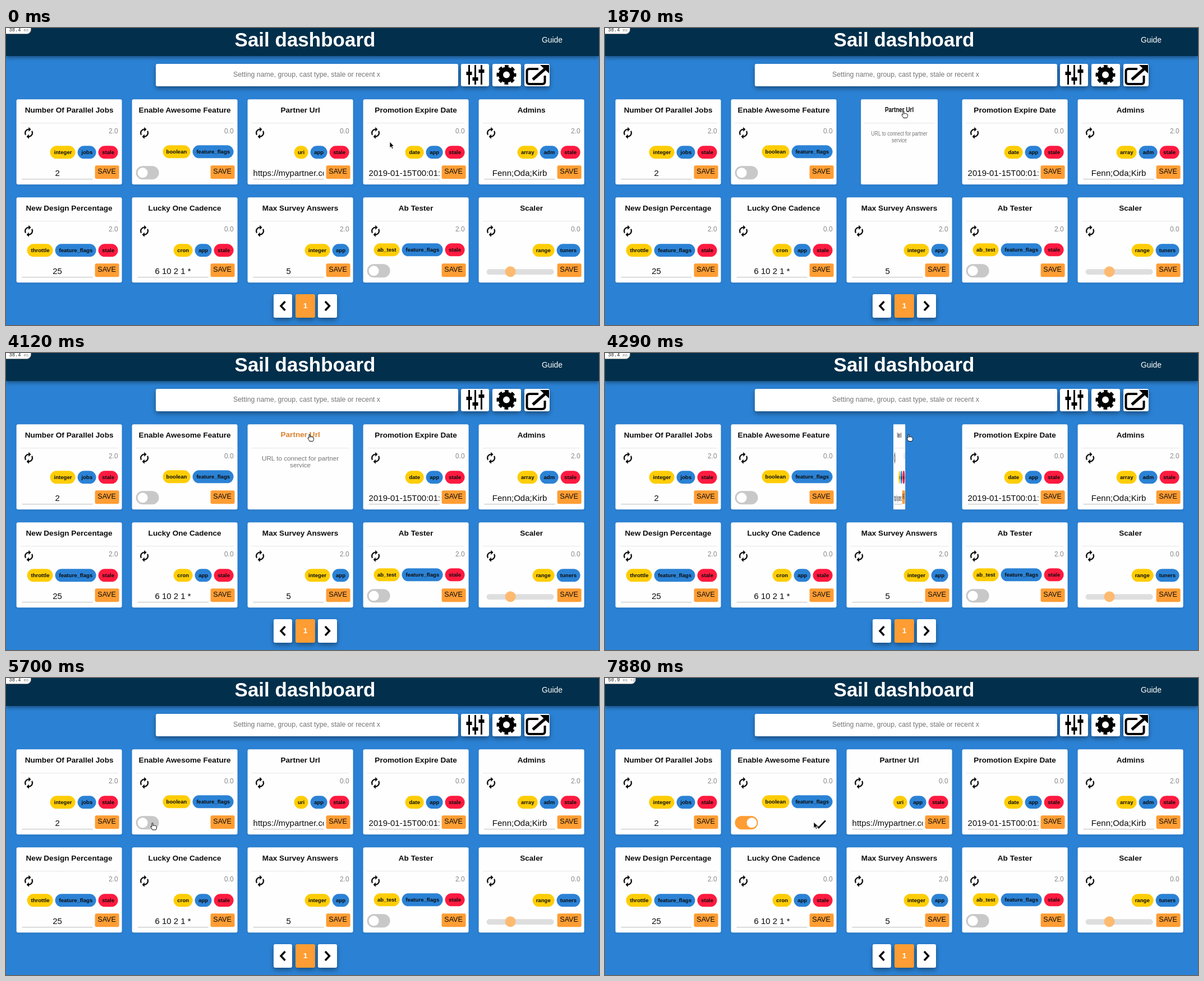
Recreate the animation shown at these times as an HTML page. Size 1057 by 530 pixels, loop 8000 ms.

```html
<!DOCTYPE html>
<html lang="en">
<head>
<meta charset="utf-8">
<title>Sail dashboard</title>
<style>
  html, body { margin: 0; width: 100%; height: 100%; overflow: hidden; }
  body { position: relative; background: #2b82d5; color: #0c0c0c; font-family: 'Liberation Sans', Arial, sans-serif; }
  body *, .box { box-sizing: border-box; }
  .box, .card, .card > * { position: absolute; white-space: nowrap; text-align: center; }
  header { position: absolute; width: 100%; height: 50px; background: #022f4b; box-shadow: 0 3px 7px #0006; }
  .panel { background: #fff; border-radius: 3px; box-shadow: 0 4px 9px #0006; }
  .panel svg { position: absolute; left: 0; top: 0; overflow: visible; }
  .card { width: 188px; height: 152px; translate: .6px .3px; background: #fefefe; border-radius: 3px; box-shadow: 0 1px 4px #0002; }
  .card h2 { left: 0; top: 10px; width: 100%; margin: 0; font-size: 13.6px; line-height: 20px; }
  .card hr { left: 7px; top: 42px; width: 174px; height: 1px; margin: 0; border: 0; background: #e4e4e4; }
  .sync { left: 11px; top: 49px; width: 22px; height: 22px; transform: scaleX(-1); stroke: #0c0c0c; stroke-width: .5; }
  .version { right: 7px; top: 47px; font-size: 12px; line-height: 20px; color: #888; }
  .tags { right: 7px; top: 83px; display: flex; gap: 4px; }
  .tags b { padding: 0 6.5px; border-radius: 12px; font-size: 9.6px; line-height: 23px; background: #2b82d5; }
  .tags b:first-child { background: #fecd06; }
  .tags b.stale { background: #ff1a40; }
  .save { left: 139.5px; top: 118px; width: 43px; height: 24px; border-radius: 3px; background: #fe9d33;
    font-size: 12.6px; line-height: 23px; }
  .input { left: 10px; top: 121px; width: 126px; height: 22px; overflow: hidden; border-bottom: 1px solid #bbb;
    font-size: 15px; line-height: 21px; }
  .toggle { left: 7px; top: 119px; width: 41px; height: 24px; border-radius: 12px; background: #c8c8c8; }
  .toggle i { position: absolute; left: 2.5px; top: 3px; width: 18px; height: 18px; border-radius: 50%; background: #fff; }
  .range { left: 13.5px; top: 127.5px; width: 120px; height: 10px; border-radius: 5px; background: #dedede; }
  .range i { position: absolute; left: 33.5px; top: -4.5px; width: 19px; height: 19px; border-radius: 50%; background: #feba70; }
  .about { left: 0; top: 54.5px; width: 100%; font-size: 11.7px; line-height: 12px; color: #757575; display: none; }
  .back > * { display: none; }
  .back > h2, .back > hr, .back > .about { display: block; }
  .back > h2 { top: 9.3px; }
  #badge { left: -1px; top: -1px; height: 12px; padding-left: 5.5px; text-align: left; background: #fff; border: 1px solid #8a8a8a;
    border-bottom-right-radius: 8px; font: 8.7px/9px 'Liberation Mono', monospace; color: #222; }
  #badge small { font-size: 7.4px; color: #888; }
  #overlay { position: absolute; left: 0; top: 0; }
</style>
</head>
<body>
<header></header>
<div class="box" style="left:333px;top:1px;width:400px;font:bold 35px/40px 'Liberation Sans',sans-serif;color:#fff">Sail dashboard</div>
<div class="box" style="left:955px;top:11px;font-size:13.9px;line-height:20px;color:#fff">Guide</div>
<div class="box" id="badge"></div>

<div class="box panel" style="left:266.5px;top:64px;width:539px;height:39.5px;font-size:12.35px;line-height:38.5px;color:#757575">Setting name, group, cast type, stale or recent x</div>
<div class="box panel" style="left:811px;top:64px;width:50px;height:40px">
  <svg width="50" height="40" stroke="#000">
    <path d="M14.5 2V37M25.5 2V37M36.5 2V37" stroke-width="3"/>
    <path d="M9.5 17h10M20.5 27h10M31.5 13h10" stroke-width="6"/>
  </svg>
</div>
<div class="box panel" style="left:867px;top:64px;width:50.5px;height:40px">
  <svg width="50" height="40" fill="none" stroke="#000">
    <circle cx="25" cy="19.5" r="10" stroke-width="8"/>
    <circle cx="25" cy="19.5" r="15" stroke-width="5" stroke-dasharray="6.6 5.18" stroke-dashoffset="3.3"/>
  </svg>
</div>
<div class="box panel" style="left:923.5px;top:64px;width:45px;height:40px">
  <svg width="45" height="40" fill="none" stroke="#000" stroke-width="4">
    <path d="M25 9H9Q4.5 9 4.5 13.5V31.5Q4.5 36 9 36H32Q36.5 36 36.5 31.5V21"/>
    <path d="M15 28L38 8" stroke-width="5"/>
    <path d="M28 2H44V17Z" fill="#000" stroke="none"/>
  </svg>
</div>

<div id="cards"></div>

<div class="box panel" style="left:477px;top:475px;width:33px;height:42px">
  <svg width="33" height="42" fill="none" stroke="#000" stroke-width="3.4"><path d="M20.5 13L13 21L20.5 29"/></svg>
</div>
<div class="box panel" style="left:516px;top:475px;width:35px;height:42px;background:#fe9d33;color:#fff;font-size:13.6px;line-height:42px;font-weight:bold">1</div>
<div class="box panel" style="left:556px;top:475px;width:33.5px;height:42px">
  <svg width="33" height="42" fill="none" stroke="#000" stroke-width="3.4"><path d="M13 13L20.5 21L13 29"/></svg>
</div>

<svg id="overlay" width="1057" height="530">
  <path id="check" d="M374.5 261L381 267L393 254.5" pathLength="1" stroke-dasharray="1 2" fill="none" stroke="#111" stroke-width="2.8"/>
  <g id="cursor">
    <path id="arrow" d="M0 0V11L2.5 8.7 4.2 12.8 6 12 4.3 8H7.6Z" fill="#000" stroke="#fff" stroke-width=".8"/>
    <path id="hand" d="M-1 1c0-1.5 2-1.5 2 0v4c2-1 5 0 6 1 1 .5.8 4-1 6.5H0C-1 10-3 8-3 6.5c.5-1 1.5-.5 2 .5z" fill="#fff" stroke="#111"/>
  </g>
</svg>

<script>
const $ = id => document.getElementById(id);

const SYNC = 'M12 4V1L8 5l4 4V6c3.31 0 6 2.69 6 6 0 1.01-.25 1.97-.7 2.8l1.46 1.46C19.54 15.03 20 13.57 20 12c0-4.42-3.58-8-8-8z' +
  'm0 14c-3.31 0-6-2.69-6-6 0-1.01.25-1.97.7-2.8L5.24 7.74C4.46 8.97 4 10.43 4 12c0 4.42 3.58 8 8 8v3l4-4-4-4v3z';
const TOGGLE = '<div class="toggle"><i></i></div>';
const RANGE = '<div class="range"><i></i></div>';
const input = text => `<div class="input">${text}</div>`;

const settings = [
  ['Number Of Parallel Jobs', '2.0', 'integer jobs stale', input('2')],
  ['Enable Awesome Feature', '0.0', 'boolean feature_flags', TOGGLE],
  ['Partner Url', '0.0', 'uri app stale', input('https://mypartner.com')],
  ['Promotion Expire Date', '0.0', 'date app stale', input('2019-01-15T00:01:00')],
  ['Admins', '2.0', 'array adm stale', input('Fenn;Oda;Kirb')],
  ['New Design Percentage', '2.0', 'throttle feature_flags stale', input('25')],
  ['Lucky One Cadence', '0.0', 'cron app stale', input('6 10 2 1 *')],
  ['Max Survey Answers', '2.0', 'integer app', input('5')],
  ['Ab Tester', '2.0', 'ab_test feature_flags stale', TOGGLE],
  ['Scaler', '0.0', 'range tuners', RANGE],
];

const tagHTML = tag => `<b${tag === 'stale' ? ' class="stale"' : ''}>${tag}</b>`;

$('cards').innerHTML = settings.map(([name, version, tags, field], i) => `
  <div class="card" style="left:${18 + 206 * (i % 5)}px;top:${i < 5 ? 127 : 302}px">
    <h2>${name}</h2><hr>
    <svg class="sync" viewBox="0 0 24 24"><path d="${SYNC}"/></svg>
    <div class="version">${version}</div>
    <div class="tags" ${field === TOGGLE ? 'style="top:82px"' : ''}>${tags.split(' ').map(tagHTML).join('')}</div>
    ${field}
    <div class="save">SAVE</div>
    <div class="about">URL to connect for partner<br>service</div>
  </div>`).join('');

const cards = document.querySelectorAll('.card');
const partner = cards[2], partnerTitle = partner.querySelector('h2');
const toggle = cards[1].querySelector('.toggle'), knob = toggle.firstChild;
const save = cards[1].querySelector('.save');

const LOOP = 8000;
// Bursts of screen updates: first, last, count
const bursts = [
  [0, 0, 1], [180, 910, 9], [1000, 1790, 10], [1870, 2050, 3], [3130, 3730, 8], [4120, 4560, 6],
  [4740, 5520, 10], [5610, 5700, 2], [5880, 6230, 5], [6490, 7270, 10], [7360, 7710, 5], [7880, 7880, 1],
];
// Cursor tip: time, x, y
const route = [
  [0, 684, 203], [179, 684, 203], [360, 668, 210], [640, 592, 190], [910, 531, 158],
  [1000, 531, 152], [1180, 532, 148], [3129, 532, 148], [3130, 535, 148], [3730, 541, 145], [4739, 541, 145],
  [4740, 537, 161], [4827, 524, 195], [5090, 380, 240], [5350, 285, 256], [5520, 266, 257], [5700, 261, 258.5],
  [6489, 261, 258.5], [6663, 344, 255], [6900, 365, 255], [7270, 372, 257], [LOOP, 372, 257],
];

const clamp = v => Math.min(1, Math.max(0, v));
const progress = (t, start, length) => clamp((t - start) / length);

// CSS "ease": cubic-bezier(.25, .1, .25, 1)
function ease(x) {
  const bezier = (s, a, b) => 3 * (1 - s) ** 2 * s * a + 3 * (1 - s) * s * s * b + s ** 3;
  let lo = 0, hi = 1;
  for (let i = 0; i < 20; i++) {
    const mid = (lo + hi) / 2;
    if (bezier(mid, .25, .25) < x) lo = mid; else hi = mid;
  }
  return bezier(lo, .1, 1);
}

// Hold each screen update until the next one
function hold(t) {
  const [first, last, count] = bursts.findLast(b => b[0] <= t);
  if (count === 1) return first;
  const step = (last - first) / (count - 1);
  return first + step * Math.min(count - 1, Math.floor((t - first + 8) / step));
}

function cursorAt(t) {
  const i = Math.max(1, route.findIndex(p => p[0] >= t));
  const [t0, x0, y0] = route[i - 1], [t1, x1, y1] = route[i];
  const k = (t - t0) / (t1 - t0);
  return [x0 + (x1 - x0) * k, y0 + (y1 - y0) * k];
}

function render(t) {
  const [x, y] = cursorAt(t);
  const overLink = t >= 999 && t < 4739 || t > 5420 && t < 6489;
  $('cursor').setAttribute('transform', `translate(${x} ${y})`);
  $('hand').style.display = overLink ? '' : 'none';
  $('arrow').style.display = overLink ? 'none' : '';

  const turn = ease(progress(t, 1594, 600)) - ease(progress(t, 4109, 600));
  const back = turn > .5;
  partner.classList.toggle('back', back);
  partner.style.transform = `scaleX(${Math.abs(Math.cos(turn * Math.PI))})`;
  const hover = back ? t > 3180 : t >= 999 && t < 2000;
  partnerTitle.style.color = hover ? '#d9822b' : '';

  const on = ease(progress(t, 5860, 400));
  const mix = (a, b) => a + (b - a) * on;
  toggle.style.background = `rgb(${mix(200, 254)},${mix(200, 157)},${mix(200, 51)})`;
  knob.style.transform = `translateX(${18 * on}px)`;

  save.style.visibility = t >= 7359 ? 'hidden' : '';
  const drawn = progress(t, 7400, 310);
  $('check').style.display = drawn ? '' : 'none';
  $('check').style.strokeDashoffset = 1 - drawn;

  const saved = t > 7500;
  $('badge').style.width = saved ? '56px' : '46px';
  $('badge').innerHTML = saved ? '50.9 <small>ms +2</small>' : '38.4 <small>ms</small>';
}

function tick() {
  render(hold(performance.now() % LOOP));
  requestAnimationFrame(tick);
}
tick();
</script>
</body>
</html>
```
